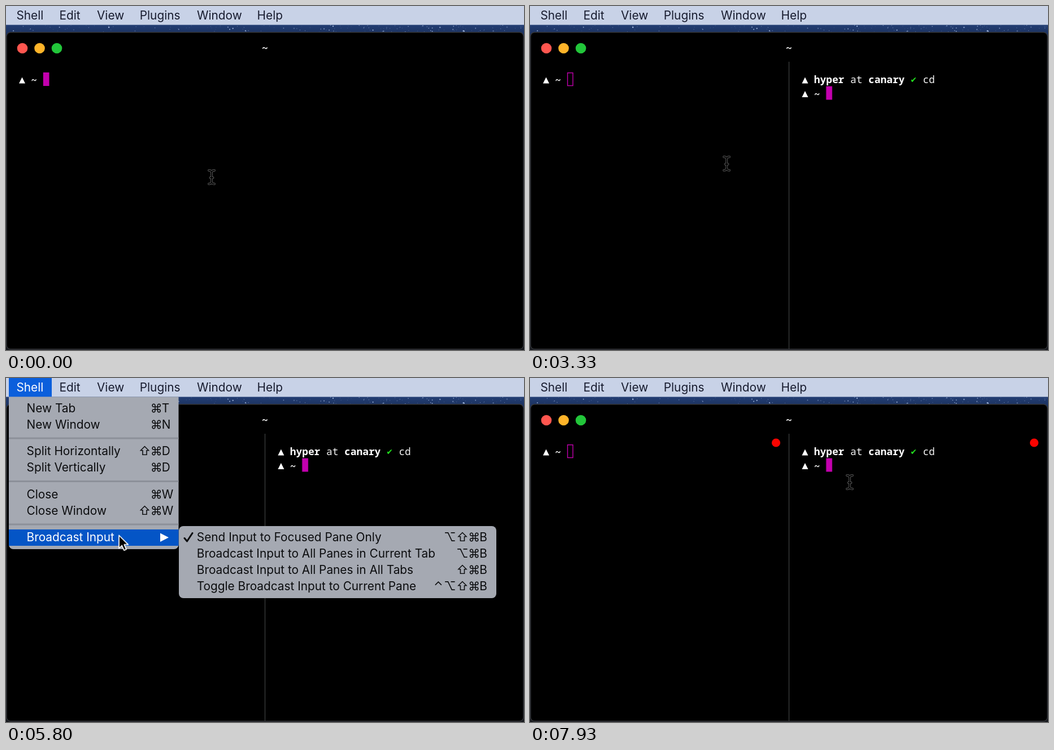
An HTML page for the animation above (8 s loop, 917 by 611 pixels).

```html
<!DOCTYPE html>
<html lang="en">
<head>
<meta charset="utf-8">
<title>Terminal panes</title>
<style>
  html, body { margin: 0; width: 100%; height: 100%; overflow: hidden; background: #16181d; }
  svg { display: block; width: 100%; height: 100%; }
  text { white-space: pre; }
  .ui { font: 20.8px Inter, sans-serif; }
  .title { font: 17.8px Inter, sans-serif; fill: #fff; text-anchor: middle; }
  .mono { font: 17.83px "Noto Sans Mono", monospace; fill: #f2f2f2; }
  .bold { font-weight: 700; fill: #fff; }
  .tick { font: 14px "DejaVu Sans", sans-serif; fill: #22e01e; }
</style>
</head>
<body>
<svg id="stage" viewBox="0 0 917 611">
  <defs>
    <linearGradient id="sky" x2="0" y2="1">
      <stop offset="0" stop-color="#233e74"/>
      <stop offset="1" stop-color="#1a2f5a"/>
    </linearGradient>
  </defs>
</svg>
<script>
const LOOP = 8000, FRAMES = 120;
const SPLIT = 470, PROMPT = 1270, KEY_C = 1670, KEY_D = 1870, ENTER = 2530;
const REAPPEAR = 3130, OPEN = 4590, SUBMENU = 5720, FADE = 6990, CLOSED = 7125;
const MAGENTA = '#c300ae', BLUE = '#0455c6', PITCH = 10.7, LINE = 24.5;

// time, x, y of the pointer
const PATH = [
  [0, 364, 304], [REAPPEAR, 364, 304], [3500, 335, 260], [4130, 92, 46],
  [4330, 74, 26], [4530, 58, 21], [4730, 58, 21], [5130, 94, 71],
  [5730, 200, 279.5], [6130, 200, 279.5], [6330, 320, 285], [6600, 346, 337],
  [6730, 350, 348], [6930, 340, 300], [7130, 340, 300], [7500, 560, 230],
  [7800, 586, 198], [7933, 566, 185], [LOOP, 566, 185]
];

const stage = document.getElementById('stage');

function add(parent, tag, attrs = {}, content) {
  const node = document.createElementNS('http://www.w3.org/2000/svg', tag);
  for (const key in attrs) node.setAttribute(key, attrs[key]);
  if (content) node.textContent = content;
  parent.append(node);
  return node;
}
const group = (parent, attrs) => add(parent, 'g', attrs);
const rect = (parent, x, y, width, height, attrs) =>
  add(parent, 'rect', { x, y, width, height, ...attrs });
const dot = (parent, cx, cy, r, fill) => add(parent, 'circle', { cx, cy, r, fill });
const label = (parent, cls, x, y, content, attrs) =>
  add(parent, 'text', { class: cls, x, y, ...attrs }, content);

// Samples a function of time into stepped keyframes.
function play(node, pose) {
  const frames = Array.from({ length: FRAMES }, (_, i) => ({
    ...pose(i * LOOP / FRAMES),
    offset: Math.max(0, (i - 0.06) / FRAMES),
    easing: 'step-end'
  }));
  frames.push({ ...pose(LOOP - 1), offset: 1 });
  node.animate(frames, { duration: LOOP, iterations: Infinity });
}
const show = (node, test) => play(node, t => ({ opacity: test(t) ? 1 : 0 }));
const between = (a, b) => t => t >= a && t < b;

function pointer(t) {
  const i = PATH.findIndex(p => p[0] > t);
  const [t0, x0, y0] = PATH[i - 1], [t1, x1, y1] = PATH[i];
  const k = (t - t0) / (t1 - t0);
  return { x: x0 + (x1 - x0) * k, y: y0 + (y1 - y0) * k };
}

function drawDesktop() {
  rect(stage, 0, 33, 917, 21, { fill: 'url(#sky)' });
  let seed = 7;
  const random = () => (seed = seed * 16807 % 2147483647) / 2147483647;
  for (let i = 0; i < 170; i++) {
    const star = dot(stage, random() * 917, 34 + random() * 12, 0.4 + random() ** 4 * 0.9, '#b9cdf2');
    star.setAttribute('opacity', 0.25 + random() * 0.6);
  }
  rect(stage, 0, 0, 917, 33.5, { fill: '#c8d2e7' });
  const items = [['Shell', 18.4], ['Edit', 94.4], ['View', 161], ['Plugins', 236.8], ['Window', 338], ['Help', 444.6]];
  for (const [name, x] of items) label(stage, 'ui', x, 24, name, { fill: '#171b2e' });
}

function drawPrompt(parent, x, row) {
  const y = 126.5 + row * LINE;
  add(parent, 'path', { d: `M${x} ${y + 11}h11l-5.5-11z`, fill: '#fff' });
}

function drawTerminal() {
  rect(stage, 1, 46.7, 915, 562.8, { rx: 7, fill: '#000', stroke: '#34363a', 'stroke-width': 1.4 });
  dot(stage, 29, 75, 9.3, '#ff564f');
  dot(stage, 59.5, 75, 9.3, '#ffb429');
  dot(stage, 90, 75, 9.3, '#22c63a');

  const inRepo = between(PROMPT, ENTER);
  show(label(stage, 'title', 458.5, 79.5, '~', { 'font-weight': 500 }), t => !inRepo(t));
  show(label(stage, 'title', 458.5, 79.5, '..ts/ZEIT/hyper'), inRepo);

  drawPrompt(stage, 23, 0);
  label(stage, 'mono bold', 44.2, 138, '~');
  show(rect(stage, 65.8, 118, 10.7, 24, { fill: MAGENTA }), t => t < SPLIT);
  show(rect(stage, 66.5, 118.7, 9.4, 22.8, { fill: 'none', stroke: MAGENTA, 'stroke-width': 1.4 }), t => t >= SPLIT);

  const left = 481.4, col = n => left + n * PITCH;
  const pane = group(stage);
  rect(pane, 457.8, 99, 1.4, 510, { fill: '#38393b' });
  show(pane, t => t >= SPLIT);

  const first = group(pane);
  drawPrompt(first, left, 0);
  label(first, 'mono bold', col(2), 137, 'hyper');
  label(first, 'mono', col(8), 137, 'at');
  label(first, 'mono bold', col(11), 137, 'canary');
  label(first, 'tick', col(18) - 0.8, 136, '✔');
  show(first, t => t >= PROMPT);
  show(label(pane, 'mono', col(20), 137, 'c'), t => t >= KEY_C);
  show(label(pane, 'mono', col(21), 137, 'd'), t => t >= KEY_D);

  const second = group(pane);
  drawPrompt(second, left, 1);
  label(second, 'mono bold', col(2), 138 + LINE, '~');
  show(second, t => t >= ENTER);

  const caret = rect(pane, left, 118, 10.7, 24, { fill: MAGENTA });
  play(caret, t => {
    const column = t < PROMPT ? 0 : t < KEY_C ? 20 : t < KEY_D ? 21 : t < ENTER ? 22 : 4;
    return { transform: `translate(${column * PITCH}px, ${t < ENTER ? 0 : LINE}px)` };
  });

  const badges = group(stage);
  for (const x of [435.5, 892.5]) dot(badges, x, 115, 7.6, '#fb0400');
  show(badges, t => t >= CLOSED);
}

// Shortcut glyphs sit in fixed columns counted from the last one.
const keyColumns = (keys, end) =>
  [...keys].map((_, i) => end - [0, 20, 41, 63, 81][keys.length - 1 - i]).join(' ');

function drawRow(parent, box, y, name, keys, active) {
  const paint = (layer, fill) => {
    label(layer, 'ui', box.text, y + 21, name, { fill });
    if (keys) label(layer, 'ui', keyColumns(keys, box.key), y + 21, keys, { fill });
    else add(layer, 'path', { d: `M273 ${y + 6.5}l15 7.7l-15 7.7z`, fill });
  };
  paint(parent, '#0b0c0e');
  const lit = group(parent);
  rect(lit, box.x, y, box.width, 29, { fill: BLUE });
  paint(lit, '#fff');
  show(lit, active);
}

function drawMenus() {
  const shell = group(stage);
  rect(shell, 5, 0, 76, 33.5, { fill: '#0b5fdc' });
  label(shell, 'ui', 18.4, 24, 'Shell', { fill: '#fff' });
  show(shell, between(OPEN, CLOSED));

  const menus = group(stage);
  play(menus, t => ({
    opacity: t < OPEN || t >= CLOSED ? 0 : t < FADE ? 1 : t < FADE + 70 ? 0.78 : 0.35
  }));

  const main = { x: 5, width: 300.5, text: 36.6, key: 275.8 };
  add(menus, 'path', { d: 'M5 33.5H305.5V296a8 8 0 0 1-8 8H13a8 8 0 0 1-8-8z', fill: '#a5a9b2' });
  for (const y of [105.5, 182, 258.5]) rect(menus, 5, y, 300.5, 3, { fill: '#8c9099' });
  const rows = [
    [40, 'New Tab', '⌘T'], [69, 'New Window', '⌘N'],
    [116, 'Split Horizontally', '⇧⌘D'], [145, 'Split Vertically', '⌘D'],
    [192.7, 'Close', '⌘W'], [221.7, 'Close Window', '⇧⌘W'],
    [269, 'Broadcast Input', '']
  ];
  const over = (t, y) => { const p = pointer(t); return p.y >= y && p.y < y + 29; };
  const inSubmenu = t => t >= SUBMENU && pointer(t).x >= 306;
  for (const [y, name, keys] of rows) {
    drawRow(menus, main, y, name, keys, t => inSubmenu(t) ? !keys : over(t, y));
  }

  const sub = group(menus);
  show(sub, t => t >= SUBMENU);
  const side = { x: 306, width: 562, text: 337.8, key: 838.2 };
  rect(sub, 306, 263, 562, 128, { rx: 8, fill: '#a5a9b2' });
  const choices = [
    ['Send Input to Focused Pane Only', '⌥⇧⌘B'],
    ['Broadcast Input to All Panes in Current Tab', '⌥⌘B'],
    ['Broadcast Input to All Panes in All Tabs', '⇧⌘B'],
    ['Toggle Broadcast Input to Current Pane', '⌃⌥⇧⌘B']
  ];
  choices.forEach(([name, keys], i) => {
    const y = 269 + i * 29;
    drawRow(sub, side, y, name, keys, t => inSubmenu(t) && over(t, y));
  });
  const tick = add(sub, 'path', {
    d: 'M316 284.5L320.5 290L330 275.5', fill: 'none',
    'stroke-width': 3, 'stroke-linecap': 'round', 'stroke-linejoin': 'round'
  });
  play(tick, t => ({ stroke: inSubmenu(t) && over(t, 269) ? '#fff' : '#0b0c0e' }));
}

function drawPointer() {
  const mouse = group(stage);
  play(mouse, t => {
    const { x, y } = pointer(t);
    return { transform: `translate(${x}px, ${y}px)`, opacity: t >= KEY_C && t < REAPPEAR ? 0 : 1 };
  });
  const overText = t => pointer(t).y > 100 && !(t >= OPEN && t < CLOSED);

  const arrow = add(mouse, 'path', {
    d: 'M0 0V22.8L5.2 18L9 26.6L13 24.8L9.3 16.4H16.3Z',
    fill: '#000', stroke: '#fff', 'stroke-width': 1.7, 'stroke-linejoin': 'round'
  });
  show(arrow, t => !overText(t));

  const beam = group(mouse, { fill: 'none', 'stroke-linecap': 'round' });
  const d = 'M-5-12Q0-12 0-8V8Q0 12-5 12M5-12Q0-12 0-8M5 12Q0 12 0 8M-2.5 1H2.5';
  add(beam, 'path', { d, stroke: '#5c5c5c', 'stroke-width': 3.8 });
  add(beam, 'path', { d, stroke: '#000', 'stroke-width': 1.8 });
  show(beam, overText);
}

drawDesktop();
drawTerminal();
drawMenus();
drawPointer();
</script>
</body>
</html>
```
